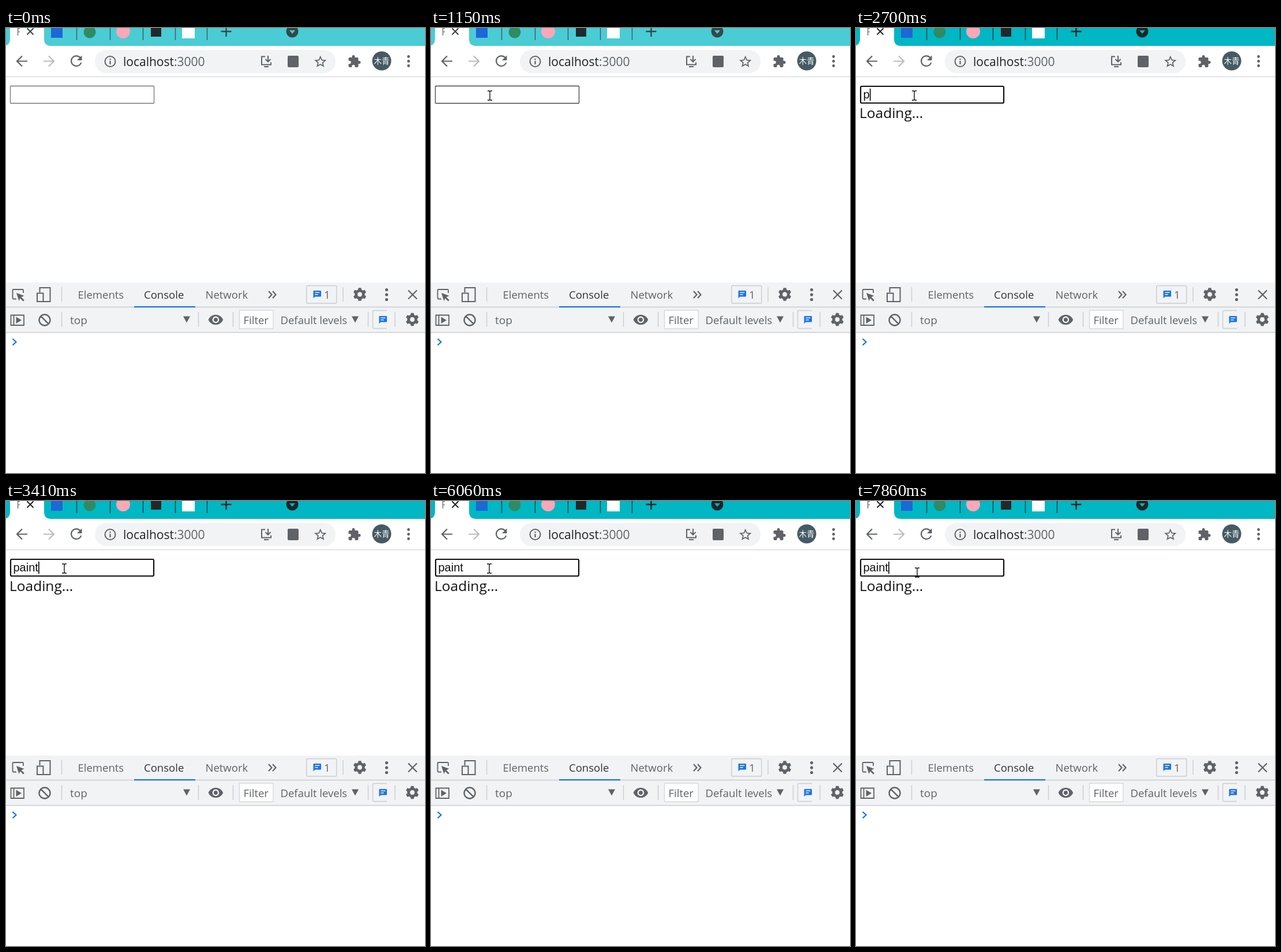
An HTML page for the animation above (8 s loop, 726 by 771 pixels).

```html
<!DOCTYPE html>
<html lang="en">
<head>
<meta charset="utf-8">
<title>Search box</title>
<style>
html, body { margin: 0; width: 100%; height: 100%; overflow: hidden; background: #fff; }
svg { display: block; width: 726px; height: 771px; --bar: #4accd5; --ink: #35474a; }
svg.active { --bar: #00b7c3; --ink: #1c2527; }
text { font-family: "Open Sans", "Noto Sans", sans-serif; font-size: 18.5px; fill: #5f6368; white-space: pre; }
.line { fill: none; stroke: #5f6368; stroke-width: 2.2; }
.solid { fill: #5f6368; }
.sep { stroke: #cacdd1; stroke-width: 1.4; fill: none; }
.ink { stroke: var(--ink); fill: none; }
#typed { font-family: "Liberation Sans", Arial, sans-serif; font-size: 20px; fill: #111; }
</style>
</head>
<body>
<svg id="stage" viewBox="0 0 726 771">
  <defs>
    <g id="gear">
      <circle r="6.3" fill="none" stroke="#5f6368" stroke-width="4.8"/>
      <g id="teeth" class="solid"></g>
    </g>
    <path id="chat" fill="#1a73e8" fill-rule="evenodd" d="M1 0H12.5Q13.5 0 13.5 1V9.5Q13.5 10.5 12.5 10.5H3L0 13.3V1Q0 0 1 0ZM2.8 2.6V4H10.8V2.6ZM2.8 6V7.4H8.2V6Z"/>
    <path id="down" class="solid" d="M0 0H12L6 11Z"/>
    <clipPath id="tabClip"><path d="M0 0H24V20H0Z"/></clipPath>
  </defs>

  <!-- tab strip -->
  <path fill="var(--bar)" d="M0 0H726V31H0Z"/>
  <path fill="#fff" d="M-5 31Q7 31 7 19V0H66V19Q66 31 78 31Z"/>
  <text x="18" y="13" clip-path="url(#tabClip)" style="fill:#777">F</text>
  <path class="ink" stroke-width="2" d="M36.5 .5L47.5 11.5M47.5 .5L36.5 11.5"/>
  <rect x="78" y="-4" width="20" height="21" fill="#1c68d6"/>
  <circle cx="145" cy="7" r="10.5" fill="#2e8b63"/>
  <circle cx="203" cy="6" r="12" fill="#faa7b8"/>
  <rect x="251" y="-3" width="18" height="18" fill="#20282a"/>
  <rect x="305" y="-4" width="22" height="22" fill="#fff"/>
  <path class="ink" stroke-width="1.5" opacity=".8" d="M122.5 0V21M180.5 0V21M237.5 0V21M293.5 0V21M348.5 0V21"/>
  <path class="ink" stroke-width="2.4" d="M372.5 6H390.5M381.5 0V15"/>
  <circle cx="496" cy="6" r="10.5" fill="var(--ink)"/>
  <path fill="var(--bar)" d="M491 4H501L496 10Z"/>

  <!-- toolbar -->
  <path stroke="#dadce0" stroke-width="1.3" d="M0 84.5H726"/>
  <path id="back" class="line" d="M37 57.5H19.5M28 48.5L19 57.5L28 66.5"/>
  <path class="line" style="stroke:#babcbe" d="M65 57.5H82.5M74 48.5L83 57.5L74 66.5"/>
  <path class="line" d="M128.4 51.2A8.8 8.8 0 1 0 130.2 60"/>
  <path class="solid" d="M131.5 47.5V56H123Z"/>
  <rect x="154" y="38" width="417" height="40" rx="20" fill="#f1f3f4"/>
  <circle class="line" style="stroke-width:2" cx="180.5" cy="58" r="9"/>
  <path class="line" d="M180.5 53V55.2M180.5 57V63"/>
  <text x="203" y="65.5" style="font-size:21px;fill:#202124">localhost<tspan fill="#5f6368">:3000</tspan></text>
  <path class="line" style="stroke-width:2" d="M449 49.5H443V63.5H459V59.5M447 67H455M454 48V58M449.5 54L454 58.5L458.5 54"/>
  <rect class="solid" x="488" y="48" width="19" height="20" rx="2"/>
  <path class="solid" fill-rule="evenodd" transform="translate(532 45.6) scale(1.06)" d="M22 9.24l-7.19-.62L12 2 9.19 8.63 2 9.24l5.46 4.73L5.82 21 12 17.27 18.18 21l-1.63-7.03zM12 15.4l-3.76 2.27 1-4.28-3.32-2.88 4.38-.38L12 6.1l1.71 4.04 4.38.38-3.32 2.88 1 4.28z"/>
  <path class="solid" transform="translate(591.5 46)" d="M20.5 11H19V7c0-1.1-.9-2-2-2h-4V3.5a2.5 2.5 0 0 0-5 0V5H4c-1.1 0-2 .9-2 2v3.8h1.5a2.7 2.7 0 0 1 0 5.4H2V20c0 1.1.9 2 2 2h3.8v-1.5a2.7 2.7 0 0 1 5.4 0V22H17c1.1 0 2-.9 2-2v-4h1.5a2.5 2.5 0 0 0 0-5z"/>
  <circle cx="651" cy="57" r="16.5" fill="#455a64"/>
  <text x="651" y="62" text-anchor="middle" style="font:13.5px 'Noto Sans CJK SC','Noto Sans CJK',sans-serif;fill:#fff">木青</text>
  <g class="solid"><circle cx="697.5" cy="49.5" r="2.4"/><circle cx="697.5" cy="57.5" r="2.4"/><circle cx="697.5" cy="65.5" r="2.4"/></g>

  <!-- page -->
  <rect id="field" fill="#fff"/>
  <text id="typed" x="12.5" y="122"></text>
  <rect id="caret" y="105" width="1.6" height="21" fill="#000"/>
  <text id="loading" x="6" y="156" style="font-size:24.5px;fill:#111">Loading...</text>

  <!-- developer tools -->
  <path fill="#f1f3f4" d="M0 441H726V527H0Z"/>
  <path class="sep" d="M0 483.5H726M0 527.5H726M96.5 449V474M584 449V474M96.5 492V518M333.5 492V518M393.5 492V518M627.5 492V518M674 492V518"/>
  <path fill="#1a73e8" d="M222 482H328V484.3H222Z"/>
  <path class="line" style="stroke-width:1.8" d="M18 469.5H13Q11.5 469.5 11.5 468V454.5Q11.5 453 13 453H28.5Q30 453 30 454.5V459"/>
  <path class="solid" d="M18 459L31.5 464L26.5 466.2L31.8 471.5L29.8 473.5L24.5 468.2L22.5 473Z"/>
  <path class="line" style="stroke-width:2" d="M58.5 458V450H76.5V474H65M54 459.5H64.5V474H54Z"/>
  <text x="124.5" y="469">Elements</text>
  <text x="239" y="469" style="fill:#333">Console</text>
  <text x="345.5" y="469">Network</text>
  <path class="line" d="M455 456L460.5 462L455 468M462 456L467.5 462L462 468"/>
  <rect class="sep" x="520.7" y="446.5" width="52" height="30.5" rx="2"/>
  <use href="#chat" x="532.5" y="455"/>
  <text x="551" y="469">1</text>
  <use href="#gear" x="613" y="461.5"/>
  <g class="solid"><circle cx="659.5" cy="453.5" r="2.6"/><circle cx="659.5" cy="462" r="2.6"/><circle cx="659.5" cy="470.5" r="2.6"/></g>
  <path class="line" d="M697 454.5L712 469.5M712 454.5L697 469.5"/>
  <path class="line" style="stroke-width:1.8" d="M8.5 497.5H31V515H8.5ZM13.5 497.5V515"/>
  <path class="solid" d="M17.5 500.5L27 506.2L17.5 512Z"/>
  <path class="line" style="stroke-width:2.4" d="M60.2 499.2L73.8 512.8M57.5 506a9.5 9.5 0 1 0 19 0a9.5 9.5 0 1 0-19 0"/>
  <text x="111" y="513" style="font-size:19px">top</text>
  <use href="#down" x="307" y="499.5"/>
  <path class="solid" fill-rule="evenodd" transform="translate(349.5 491.5) scale(1.16)" d="M12 4.5C7 4.5 2.73 7.61 1 12c1.73 4.39 6 7.5 11 7.5s9.27-3.11 11-7.5c-1.73-4.39-6-7.5-11-7.5zM12 17a5 5 0 1 1 0-10a5 5 0 1 1 0 10zM12 9a3 3 0 1 0 0 6a3 3 0 1 0 0-6z"/>
  <rect x="404.5" y="489" width="58.5" height="32" fill="#fff" stroke="#d5d8db" stroke-width="1.4"/>
  <text x="411.5" y="513">Filter</text>
  <text x="475.5" y="513">Default levels</text>
  <use href="#down" x="599" y="499.5"/>
  <path class="sep" d="M660 489.5H637.5Q635.5 489.5 635.5 491.5V518.5Q635.5 520.5 637.5 520.5H660"/>
  <use href="#chat" x="646.5" y="499"/>
  <use href="#gear" x="704" y="505"/>
  <path fill="none" stroke="#1a73e8" stroke-width="2.2" d="M11.5 538.5L17.5 544L11.5 549.5"/>

  <!-- pointer -->
  <circle id="click" cx="99" cy="116" r="12" fill="#ffff4d"/>
  <path id="beam" fill="none" stroke="#111" stroke-width="1.4" d="M-4 -8H-1.5Q0 -8 0 -6.5Q0 -8 1.5 -8H4M0 -7V7M-4 8H-1.5Q0 8 0 6.5Q0 8 1.5 8H4"/>
  <path id="arrow" fill="#fff" stroke="#000" d="M0 0V17L4 13.2L6.7 19.3L9.2 18.2L6.6 12.2H12Z"/>
</svg>
<script>
const LOOP = 8000;
const $ = id => document.getElementById(id);
const stage = $('stage'), field = $('field'), typed = $('typed'), caret = $('caret');

$('teeth').innerHTML = [0, 60, 120, 180, 240, 300]
  .map(a => `<path transform="rotate(${a})" d="M-3.2 -7.5L-2.4 -11.3H2.4L3.2 -7.5Z"/>`).join('');

const typing = [[0, ''], [2700, 'p'], [2860, 'pa'], [2940, 'pai'], [3250, 'pain'], [3410, 'paint']];
const blink = [[0, false], [1220, true], [1790, false], [2320, true], [3970, false], [4510, true],
  [5040, false], [5510, true], [6060, false], [6620, true], [7140, false], [7700, true]];

const at = (steps, t) => steps.filter(s => s[0] <= t).pop()[1];
const show = (id, on) => $(id).setAttribute('visibility', on ? 'visible' : 'hidden');
const set = (el, attrs) => { for (const k in attrs) el.setAttribute(k, attrs[k]); };

// Pointer position, sampled in 79-80 ms steps
function pointer(t) {
  if (t < 290) return null;
  if (t < 1150) {
    const u = Math.min(10, Math.floor((t - 290) / 79)) / 10;
    const p = 1 - (1 - u) ** 2;
    return [704 - 601 * p, 750 - 633 * p - 75 * Math.sin(Math.PI * u)];
  }
  if (t < 1220) return [102, 117];
  if (t < 7380) return [101, 117];
  const u = Math.min(7, Math.floor((t - 7380) / 80) + 1) / 7;
  return [101 + 5 * u, 117 + 7 * u];
}

function draw(t) {
  const focus = t >= 1220;
  const pos = pointer(t);
  const over = !!pos && pos[0] > 7 && pos[0] < 257 && pos[1] > 100 && pos[1] < 131;
  stage.classList.toggle('active', focus);
  set(field, focus
    ? { x: 8, y: 101, width: 248, height: 29, rx: 2, stroke: '#101010', 'stroke-width': 2.2 }
    : { x: 7.5, y: 100.5, width: 249, height: 30, rx: 1, stroke: over ? '#444' : '#767676', 'stroke-width': 1.3 });

  const word = at(typing, t);
  if (typed.textContent !== word) typed.textContent = word;
  caret.setAttribute('x', 12.7 + (word ? typed.getComputedTextLength() : 0));
  show('caret', at(blink, t));
  show('loading', t >= 2700);
  show('click', t >= 1220 && t < 1310);
  show('beam', over);
  show('arrow', pos && !over);
  if (pos) for (const id of ['beam', 'arrow']) $(id).setAttribute('transform', `translate(${pos})`);
}

const start = performance.now();
function tick() {
  draw((performance.now() - start) % LOOP);
  requestAnimationFrame(tick);
}
tick();
</script>
</body>
</html>
```
